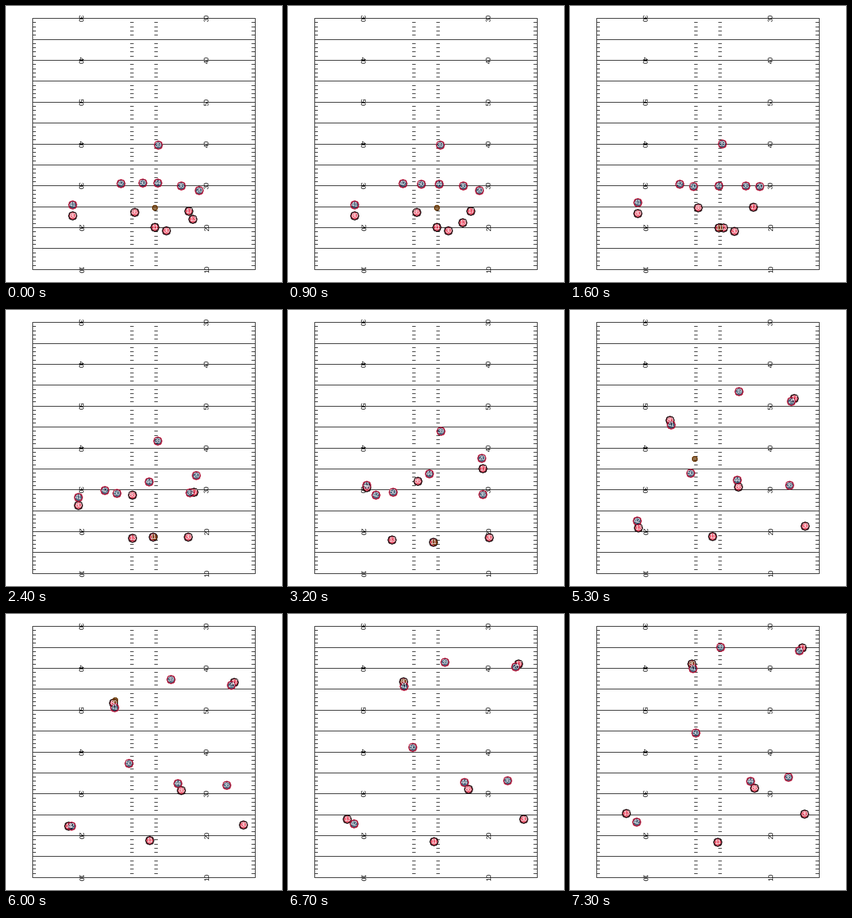
A matplotlib script for the animation above (7400 ms loop, 480 px wide and 480 px high).

```python
import matplotlib.pyplot as plt
import numpy as np
from matplotlib.animation import FuncAnimation
from matplotlib.patches import Circle, Rectangle

SIZE, FRAMES, STEP = 480, 74, 100
LEFT, RIGHT, TOP, YARD = 46, 433, 21.2, 7.277
SNAP, CAUGHT, THROW, CATCH = 11, 16, 44, 60
BEATS = (32, 53, FRAMES - 1)
FONT = "Liberation Sans"
RED, BLUE = ("#e31837", "#000000"), ("#002244", "#c60c30")
BROWN = ("#663300", "#663300")
TIME = np.arange(FRAMES)


def run(start, *points):
    """Smooth run from rest at `start` through one point per beat."""
    keys = np.array((start,) + BEATS, float)
    pts = np.array(points, float)
    slope = np.gradient(pts, keys, axis=0)
    slope[0] = 0
    t = np.clip(TIME, start, None)
    k = np.clip(np.searchsorted(keys, t, side="right") - 1, 0, len(BEATS) - 1)
    h = (keys[k + 1] - keys[k])[:, None]
    u = (t - keys[k])[:, None] / h
    ease = u * u * (3 - 2 * u)
    return (pts[k] + (pts[k + 1] - pts[k]) * ease
            + h * u * (1 - u) * ((1 - u) * slope[k] - u * slope[k + 1]))


def cover(runner, gap, end_gap, begin, end):
    """Follow a runner while the gap eases from one offset to another."""
    begin, end = np.array(begin), np.array(end)
    u = np.clip((TIME[:, None] - begin) / (end - begin), 0, 1)
    ease = u * u * (3 - 2 * u)
    return runner + np.array(gap) * (1 - ease) + np.array(end_gap) * ease


def ball_path(spot, passer, receiver):
    path = passer + [2, 0]
    path[:SNAP] = spot
    path[SNAP:CAUGHT + 1] = np.linspace(spot, path[CAUGHT], CAUGHT - SNAP + 1)
    path[THROW:CATCH + 1] = np.linspace(path[THROW], receiver[CATCH] + [3, -5],
                                        CATCH - THROW + 1)
    path[CATCH + 1:] = receiver[CATCH + 1:]
    return path


offense = {
    80: run(SNAP, (116, 365), (137, 309), (174, 192), (212, 87)),
    86: run(SNAP, (224, 359), (226, 298), (293, 308), (321, 303)),
    17: run(SNAP, (318, 357), (339, 276), (390, 154), (404, 59)),
    13: run(0, (325, 371), (181, 400), (119, 379), (98, 347)),
    11: run(14, (259, 385), (253, 404), (248, 394), (257, 397)),
    30: run(SNAP, (279, 391), (350, 396), (409, 376), (408, 348)),
}
defense = {
    39: run(SNAP, (265, 242), (266, 211), (294, 142), (262, 58)),
    50: run(3, (238, 308), (183, 317), (210, 284), (219, 207)),
    44: cover(offense[86], (40, -51), (-7, -12), (5, 5), (65, 34)),
    36: run(14, (305, 313), (339, 321), (382, 305), (380, 284)),
    20: cover(offense[17], (18, -36), (-5, 5), (0, 14), (41, 53)),
    42: run(8, (200, 309), (153, 322), (117, 367), (116, 362)),
    41: cover(offense[80], (0, -19), (2, 8), (14, 14), (70, 48)),
}
ball = ball_path((259, 351), offense[11], offense[80])

fig = plt.figure(figsize=(SIZE / 72, SIZE / 72), dpi=72, facecolor="white")
ax = fig.add_axes([0, 0, 1, 1])
ax.set(xlim=(0, SIZE), ylim=(SIZE, 0))
ax.axis("off")


def bar(x, y, w, h):
    ax.add_patch(Rectangle((x, y), w, h, fc="black", lw=0, zorder=1))


def draw_field():
    top, bottom = round(TOP), round(TOP + 60 * YARD)
    for x in (LEFT, RIGHT):
        bar(x, top, 1, bottom - top + 1)
    for yard in range(61):
        y = round(TOP + yard * YARD)
        if yard % 5 == 0:
            bar(LEFT, y, RIGHT - LEFT + 1, 1)
        else:
            for x in (LEFT, 216, 258, RIGHT - 6):
                bar(x, y, 6, 1)
        if yard % 10 == 0:
            for x, angle in ((129, 270), (350, 90)):
                ax.text(x, y, 50 - abs(yard - 20), rotation=angle, ha="center",
                        va="center", family=FONT, size=11.4, zorder=2)


def add_actor(path, radius, colors, num=""):
    dot = Circle((0, 0), radius, fc=colors[0], ec=colors[1], lw=1,
                 alpha=0.7, antialiased=False, zorder=3)
    label = ax.text(0, 0, num, ha="center", va="center", family=FONT,
                    size=10.8, color="white", zorder=4)
    actors.append((path, ax.add_patch(dot), label))


draw_field()
actors = []
for num, path in offense.items():
    add_actor(path, 6.75, RED, num)
add_actor(ball, 4.2, BROWN)
for num, path in defense.items():
    add_actor(path, 6.75, BLUE, num)


def update(frame):
    for path, dot, label in actors:
        spot = np.round(path[frame])
        dot.set_center(spot)
        label.set_position(spot)
    return []


anim = FuncAnimation(fig, update, frames=FRAMES, interval=STEP,
                     repeat=True, repeat_delay=0, blit=False)
plt.show()
```
